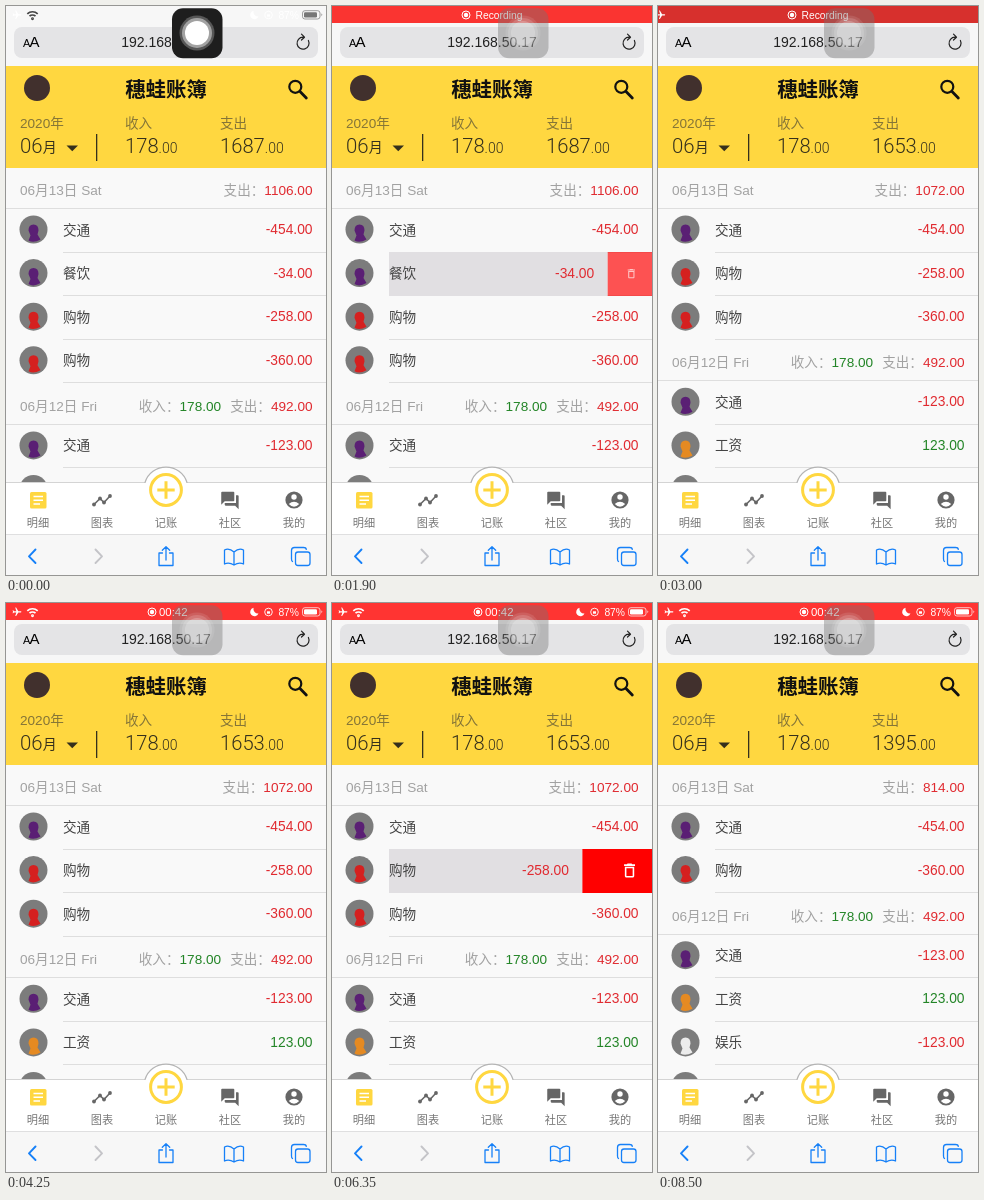
An HTML page that plays this animation: 320x569 px, repeating every 8550 ms.

```html
<!DOCTYPE html>
<html lang="zh-CN">
<head>
<meta charset="utf-8">
<style>
  html, body { margin: 0; width: 100%; height: 100%; overflow: hidden; background: #f9f9f9; }
  svg { display: block; width: 100vw; height: 100vh; }
  text { font-family: "Liberation Sans", "Noto Sans CJK SC", "Noto Sans CJK", sans-serif; font-size: 13.6px; font-weight: 300; }
  .light { font-family: Roboto, "Noto Sans CJK SC", "Noto Sans CJK", sans-serif; }
  .amount { font-size: 13.8px; }
  .small { font-size: 10.3px; }
  .tab { font-size: 11.2px; fill: #777; text-anchor: middle; }
  .line { fill: none; stroke-linecap: round; stroke-linejoin: round; }
</style>
</head>
<body>
<svg viewBox="0 0 320 569" preserveAspectRatio="none">
  <defs>
    <path id="plane" d="M21 16v-2l-8-5V3.5a1.5 1.5 0 0 0-3 0V9l-8 5v2l8-2.5V19l-2 1.5V22l3.5-1 3.5 1v-1.5L13 19v-5.5z"/>
    <path id="trash" d="M6 19c0 1.1.9 2 2 2h8c1.1 0 2-.9 2-2V7H6zM8 9h8v10H8zm7.5-5l-1-1h-5l-1 1H5v2h14V4z" fill-rule="evenodd"/>
    <path id="figure" d="M-5 1Q-5-5 0-5Q5-5 5 1L4 5L7 10Q0 14-5 11L-3 6Z"/>
    <g id="recordMark"><circle r="4" fill="none" stroke="#fff"/><circle r="2.2"/></g>
  </defs>
  <rect width="320" height="569" fill="#f9f9f9"/>
  <g id="list"></g>

  <!-- browser bar -->
  <rect width="320" height="60" fill="#f7f7f7"/>
  <rect x="8" y="21" width="304" height="31" rx="8" fill="#e4e4e6"/>
  <text x="17" y="41" style="font-size:11px">A</text>
  <text x="23.5" y="41" style="font-size:15px">A</text>
  <text x="160" y="41" text-anchor="middle" fill="#222" style="font-size:14px">192.168.50.17</text>
  <path class="line" d="M302.4 34.5A6 6 0 1 1 297 31.2M295.5 28.2L298.5 31.2L295.5 34" stroke="#222" stroke-width="1.2"/>

  <!-- summary header -->
  <rect y="60" width="320" height="102" fill="#ffd740"/>
  <circle cx="31" cy="82" r="13" fill="#41302d"/>
  <text x="160" y="91" text-anchor="middle" fill="#111" style="font-size:20.4px;font-weight:700">穗蛙账簿</text>
  <g class="line" stroke="#111" stroke-width="2.2"><circle cx="289.3" cy="80.8" r="6"/><path d="M294 85.6L300.3 92" stroke-width="2.8"/></g>
  <g fill="#857537">
    <text x="14" y="122">2020年</text>
    <text x="119" y="122">收入</text>
    <text x="214" y="122">支出</text>
  </g>
  <g fill="#35301c">
    <text class="light" x="14" y="147" style="font-size:20.4px">06<tspan font-size="14" dy="-1">月</tspan></text>
    <text class="light" x="119" y="147" style="font-size:20.2px">178<tspan font-size="14">.00</tspan></text>
    <text class="light" x="214" y="147" style="font-size:20.2px"><tspan id="total"></tspan><tspan font-size="14">.00</tspan></text>
    <path d="M60.5 139.5h11.5l-5.75 5.8z"/>
    <path d="M90 128h1.3v27H90z"/>
  </g>

  <!-- tab bar -->
  <rect y="476" width="320" height="53" fill="#fff"/>
  <path d="M0 476.5H320" stroke="#d4d4d4"/>
  <circle cx="160" cy="483" r="22" fill="#fff"/>
  <path d="M139 476.5A22 22 0 0 1 181 476.5" class="line" stroke="#b4b4b4" stroke-width="1.2"/>
  <g stroke="#ffd740" stroke-width="3" fill="none"><circle cx="160" cy="484" r="15.4"/><path d="M151.3 484h17.4M160 475.3v17.4"/></g>
  <rect x="24" y="486" width="16.5" height="16.5" rx="1.5" fill="#ffd740"/>
  <path d="M27.5 490.5h9.5M27.5 494.2h9.5M27.5 498h6.5" stroke="#fff" stroke-width="1.6"/>
  <g fill="#666" stroke="#666">
    <path class="line" d="M88 498.5l6-6 4 4 6-6.5" stroke-width="1.6"/>
    <g stroke="none"><circle cx="88" cy="498.5" r="1.9"/><circle cx="94" cy="492.5" r="1.9"/><circle cx="98" cy="496.5" r="1.9"/><circle cx="104" cy="490" r="1.9"/></g>
    <path stroke="none" transform="translate(213.5 484) scale(.87)" d="M21 6h-2v9H6v2c0 .55.45 1 1 1h11l4 4V7c0-.55-.45-1-1-1zm-4 6V3c0-.55-.45-1-1-1H3c-.55 0-1 .45-1 1v14l4-4h10c.55 0 1-.45 1-1z"/>
    <circle cx="288" cy="494" r="8.6" stroke="none"/>
  </g>
  <circle cx="288" cy="491" r="2.7" fill="#fff"/>
  <path d="M282.8 498Q288 493.6 293.2 498Q288 503.5 282.8 498" fill="#fff"/>
  <g id="tabs"></g>

  <!-- browser toolbar -->
  <rect y="528" width="320" height="41" fill="#f7f7f7"/>
  <path d="M0 528.5H320" stroke="#dfdfe0"/>
  <g class="line" stroke="#1680f8" stroke-width="1.3">
    <path d="M29.5 543.5L23 550.3L29.5 557" stroke-width="1.9"/>
    <path d="M89.5 543.5L96 550.3L89.5 557" stroke="#c4c4c8" stroke-width="1.9"/>
    <path d="M156.5 547H153V559.5H167V547H163.5M160 554V541M156.3 544.3L160 540.7L163.7 544.3"/>
    <path d="M228 546Q223 541.5 218.5 544V558Q223 556 228 559Q233 556 237.5 558V544Q233 541.5 228 546V559"/>
    <rect x="289.5" y="546" width="14.5" height="13.5" rx="2.5"/>
    <path d="M286.5 555.5Q285.5 555 285.5 553V544.5Q285.5 541.5 288.5 541.5H297.5Q300 541.5 300.3 543.3"/>
  </g>

  <!-- status bar -->
  <rect id="red" width="320" height="17"/>
  <g id="recording" fill="#fff">
    <use href="#recordMark" x="134" y="9"/>
    <text class="small" x="143.5" y="12.7">Recording</text>
  </g>
  <g id="clock" fill="#fff">
    <use href="#recordMark" x="146" y="9"/>
    <text x="153" y="12.7" style="font-size:11.4px">00:42</text>
  </g>
  <g id="statusPlane" fill="#fff"><use href="#plane" transform="translate(11 8.8) rotate(90) scale(.44) translate(-11.5 -12)"/></g>
  <g id="wifi" transform="translate(26.5 12.8)" fill="none" stroke-width="1.7"><path d="M-5.2-5A7.6 7.6 0 0 1 5.2-5M-3-2.6A4.3 4.3 0 0 1 3-2.6"/><circle r=".6"/></g>
  <g id="statusRight" fill="#fff">
    <path d="M247.5 4.8A4.3 4.3 0 1 0 252.5 10.5A4.7 4.7 0 0 1 247.5 4.8"/>
    <circle cx="262.5" cy="9" r="3.8" fill="none" stroke="#fff" stroke-width=".9"/>
    <rect x="261" y="8.3" width="3" height="2.4"/>
    <text class="small" x="293" y="12.6" text-anchor="end">87%</text>
    <g id="battery">
      <rect x="296.5" y="4.7" width="17.5" height="8.3" rx="2.4" fill="none" stroke="currentColor" stroke-opacity=".7"/>
      <rect x="298" y="6.2" width="13" height="5.3" rx="1.2" fill="currentColor"/>
      <path d="M315.5 7.3q1.6 1.5 0 3z" fill="currentColor"/>
    </g>
  </g>

  <!-- floating touch button -->
  <g>
    <rect id="touchBox" x="166" y="2.2" width="50.5" height="50" rx="11"/>
    <g id="touchRings" fill="#fff"><circle cx="191" cy="27" r="17.5" opacity=".25"/><circle cx="191" cy="27" r="15" opacity=".45"/><circle cx="191" cy="27" r="12"/></g>
  </g>
</svg>
<script>
const LOOP = 8550, PITCH = 43.6, OPEN = 80, PULSE = 2125;
const RED = '#e02a30', GREEN = '#238527', GRAY = '#a2a2a2';
const PURPLE = '#5a1f74', SCARLET = '#d5201f', ORANGE = '#e58a22', WHITE = '#ececec';
const swipes = [
  { id: 'meal', start: 1700, length: 375, removed: 2450 },
  { id: 'shop', start: 6080, length: 350, removed: 7800 }
];
const days = [
  { title: '06月13日 Sat', rows: [
    { name: '交通', amount: -454, color: PURPLE },
    { id: 'meal', name: '餐饮', amount: -34, color: PURPLE },
    { id: 'shop', name: '购物', amount: -258, color: SCARLET },
    { name: '购物', amount: -360, color: SCARLET }] },
  { title: '06月12日 Fri', income: 178, expense: 492, rows: [
    { name: '交通', amount: -123, color: PURPLE },
    { name: '工资', amount: 123, color: ORANGE },
    { name: '娱乐', amount: -123, color: WHITE },
    { name: '娱乐', amount: -123, color: WHITE }] }
];

const $ = id => document.getElementById(id);
const clamp = x => Math.max(0, Math.min(1, x));
const ramp = (t, from, to) => clamp((t - from) / (to - from));
const smooth = p => p * p * (3 - 2 * p);
const mix = (a, b, p) => a + (b - a) * p;
const fade = (id, value) => $(id).setAttribute('opacity', value);
const rule = (x, y) => `<path d="M${x} ${y + .5}H320" stroke="#dedede"/>`;
const labelled = (label, value, color, dx = 0) =>
  `<tspan fill="${GRAY}" dx="${dx}">${label}：</tspan><tspan fill="${color}">${value.toFixed(2)}</tspan>`;

function headerMarkup(day, expense, y) {
  const income = day.income ? labelled('收入', day.income, GREEN) : '';
  return `<text x="14" y="${y + 5}" fill="${GRAY}">${day.title}</text>
    <text x="306.5" y="${y + 5}" text-anchor="end">${income}${labelled('支出', expense, RED, income ? 9 : 0)}</text>
    ${rule(0, Math.floor(y + 18.5))}`;
}

function rowMarkup(row, y, offset) {
  const edge = 320 - offset, shown = clamp(offset / 66), top = Math.round(y - 21.2);
  const drawer = offset > 0 ? `
    <rect x="57" y="${top}" width="${edge - 57}" height="44" fill="#e1dfe2"/>
    <rect x="${edge}" y="${top}" width="${offset}" height="44" fill="#f00" opacity="${shown}"/>
    <use href="#trash" fill="#fff" opacity="${shown}" transform="translate(303 ${y + .5}) scale(${.78 * shown}) translate(-19 -12)"/>` : '';
  return `${rule(57, Math.round(y + 22))}${drawer}
    <g transform="translate(27.5 ${y})"><circle r="14" fill="#7c7c7c"/><use href="#figure" fill="${row.color}"/></g>
    <text x="57" y="${y + 5}" fill="#444">${row.name}</text>
    <text class="amount" x="${306.5 - offset}" y="${y + 4.4}" text-anchor="end" fill="${row.amount < 0 ? RED : GREEN}">${row.amount.toFixed(2)}</text>`;
}

function drawList(t) {
  const swipeOf = row => swipes.find(s => row.id && s.id === row.id);
  let y = 184, markup = '', total = 0;
  for (const day of days) {
    const rows = day.rows.filter(row => !swipeOf(row) || t < swipeOf(row).removed);
    const expense = day.expense || -rows.reduce((sum, row) => sum + row.amount, 0);
    markup += headerMarkup(day, expense, y);
    y += 39.5;
    for (const row of rows) {
      const s = swipeOf(row);
      const offset = s ? OPEN * smooth(ramp(t, s.start, s.start + s.length)) : 0;
      markup += rowMarkup(row, y, offset);
      y += PITCH;
    }
    y += 2;
    total += expense;
  }
  $('list').innerHTML = markup;
  $('total').textContent = total + 89;
}

function drawStatus(t) {
  const start = ramp(t, 50, 350), back = ramp(t, 3150, 3400), early = t < 350;
  const glow = (1 + Math.cos(2 * Math.PI * t / PULSE)) / 2;
  $('red').setAttribute('fill', `rgb(${mix(212, 255, glow)},${mix(48, 52, glow)},${mix(45, 50, glow)})`);
  fade('red', start);
  fade('recording', start * (1 - ramp(t, 3050, 3250)));
  fade('clock', back);
  const slide = early ? 0 : -20 + 20 * smooth(ramp(t, 2850, 3120));
  $('statusPlane').setAttribute('transform', `translate(${slide} 0)`);
  fade('statusPlane', early ? 1 - start : 1);
  fade('wifi', early ? 1 - start : back);
  $('wifi').setAttribute('stroke', early ? '#444' : '#fff');
  $('battery').setAttribute('color', early ? '#777' : '#fff');
  fade('statusRight', early ? 1 - start : back);
}

function drawTouch(t) {
  const idle = smooth(ramp(t, 400, 900)), shade = mix(30, 115, idle);
  $('touchBox').setAttribute('fill', `rgb(${shade},${shade},${shade})`);
  fade('touchBox', mix(1, .4, idle));
  fade('touchRings', mix(1, .4, idle));
}

$('tabs').innerHTML = ['明细', '图表', '记账', '社区', '我的']
  .map((name, i) => `<text class="tab" x="${32 + 64 * i}" y="521">${name}</text>`).join('');

const origin = performance.now();
function frame() {
  const t = (performance.now() - origin) % LOOP;
  drawList(t);
  drawStatus(t);
  drawTouch(t);
  requestAnimationFrame(frame);
}
frame();
</script>
</body>
</html>
```
